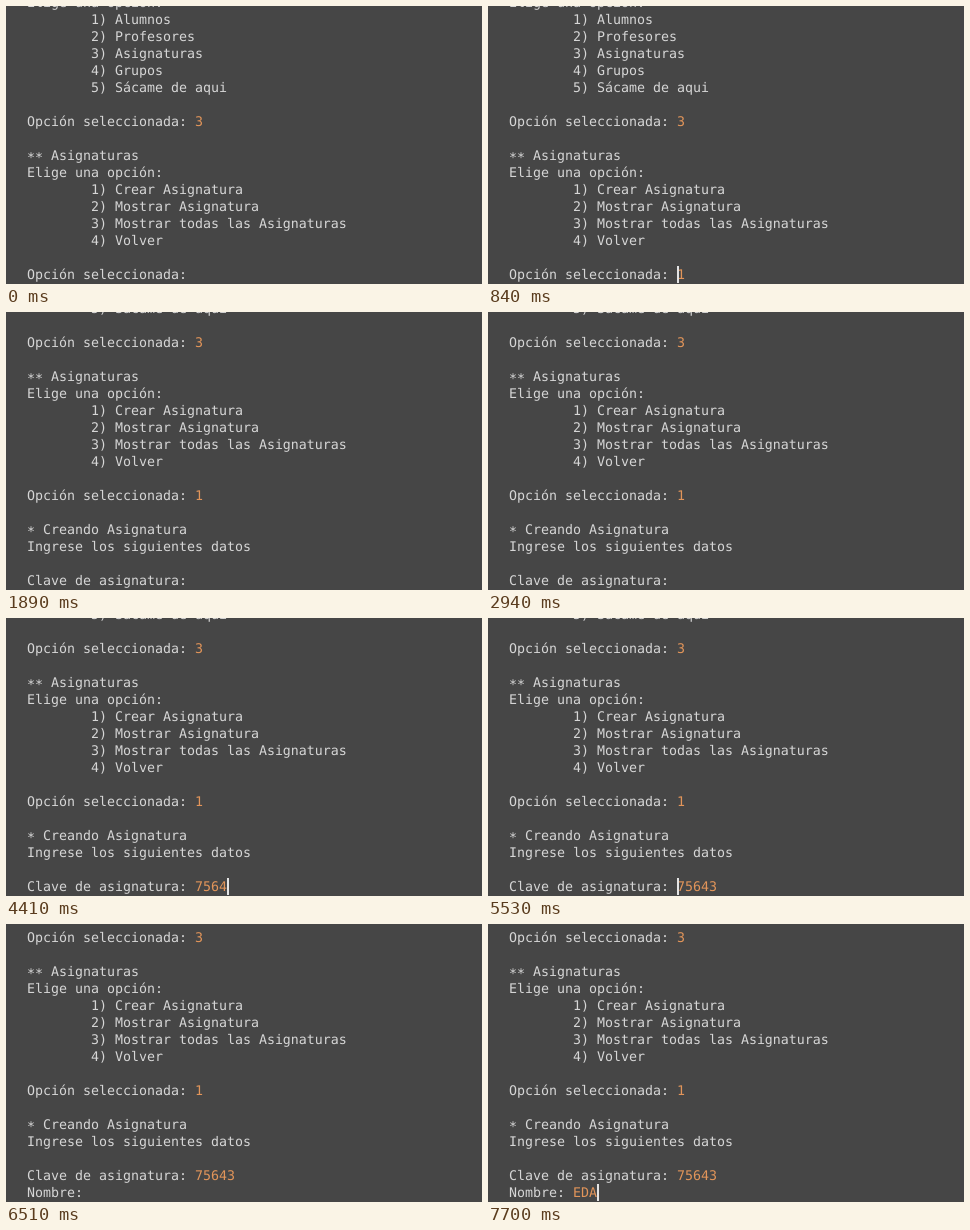
Write an HTML page that moves like this. It is 476x278 px and loops after 8000 ms.

```html
<!DOCTYPE html>
<html lang="es">
<head>
<meta charset="utf-8">
<title>Consola</title>
<style>
  html, body { margin: 0; width: 100%; height: 100%; overflow: hidden; background: #464646; }
  svg { display: block; width: 476px; height: 278px; }
  text {
    font: 13.29px "DejaVu Sans Mono", monospace;
    fill: #d6d6d6;
    white-space: pre;
    text-rendering: geometricPrecision;
  }
  .input { fill: #e2955a; }
</style>
</head>
<body>
<svg viewBox="0 0 476 278">
  <rect width="476" height="278" fill="#464646"/>
  <g id="screen"></g>
  <rect id="caret" width="2" height="17" fill="#e4e4e4"/>
</svg>
<script>
const LOOP = 8000, LEFT = 21, CELL = 8, ROW = 17, LAST_ROW = 260, BASE = 13;
const TAB = ' '.repeat(8);
const PROMPT = 'Opción seleccionada: ';

// Each line: printed text, then the typed part if any
const lines = [
  ['Elige una opción:'],
  [TAB + '1) Alumnos'],
  [TAB + '2) Profesores'],
  [TAB + '3) Asignaturas'],
  [TAB + '4) Grupos'],
  [TAB + '5) Sácame de aqui'],
  [''],
  [PROMPT, '3'],
  [''],
  ['** Asignaturas'],
  ['Elige una opción:'],
  [TAB + '1) Crear Asignatura'],
  [TAB + '2) Mostrar Asignatura'],
  [TAB + '3) Mostrar todas las Asignaturas'],
  [TAB + '4) Volver'],
  [''],
  [PROMPT, '1'],
  [''],
  ['* Creando Asignatura'],
  ['Ingrese los siguientes datos'],
  [''],
  ['Clave de asignatura: ', '75643'],
  ['Nombre: ', 'EDA']
];
const OPTION = 16, KEY = 21, NAME = 22;

// start time, bottom line, typed characters, caret column (-1 = hidden), bottom prompt shown
const steps = [
  [0, OPTION, 0, -1],
  [420, OPTION, 1, 22],
  [840, OPTION, 1, 21],
  [1120, KEY, 0, 0],
  [1400, KEY, 0, 21],
  [1890, KEY, 0, -1],
  [2380, KEY, 0, 21],
  [2940, KEY, 0, -1],
  [3220, KEY, 1, 22],
  [3570, KEY, 2, 23],
  [3920, KEY, 3, 24],
  [4410, KEY, 4, 25],
  [4900, KEY, 4, -1],
  [5180, KEY, 5, 26],
  [5530, KEY, 5, 21],
  [5740, NAME, 0, 0, false],
  [5810, NAME, 0, 0],
  [6020, NAME, 0, 8],
  [6510, NAME, 0, -1],
  [7070, NAME, 0, 8],
  [7280, NAME, 1, 9],
  [7560, NAME, 2, 10],
  [7700, NAME, 3, 11]
];

const screen = document.getElementById('screen');
const caret = document.getElementById('caret');

function svg(name, attrs, parent, content = '') {
  const el = document.createElementNS('http://www.w3.org/2000/svg', name);
  for (const key in attrs) el.setAttribute(key, attrs[key]);
  el.textContent = content;
  return parent.appendChild(el);
}

// Asterisks sit at mid-height, so they are lowered slightly
function addRow([printed, typed = ''], i) {
  const y = i * ROW + BASE;
  const stars = printed.match(/^\**/)[0];
  const put = (col, text, cls, dy = 0) =>
    svg('text', { x: LEFT + col * CELL, y: y + dy, class: cls }, row, text);
  const row = svg('g', {}, screen);
  if (stars) put(0, stars, 'label', 2);
  const label = put(stars.length, printed.slice(stars.length), 'label');
  const input = put(printed.length, typed, 'input');
  return { row, label, input, typed };
}

const rows = lines.map(addRow);
let shown = null;

function draw(time) {
  const step = steps.findLast(s => s[0] <= time % LOOP);
  if (step === shown) return;
  shown = step;
  const [, bottom, count, column, prompt = true] = step;
  screen.setAttribute('transform', `translate(0 ${LAST_ROW - bottom * ROW})`);
  rows.forEach(({ row, label, input, typed }, i) => {
    row.setAttribute('visibility', i <= bottom ? 'visible' : 'hidden');
    label.setAttribute('opacity', i < bottom || prompt ? 1 : 0);
    input.textContent = i < bottom ? typed : typed.slice(0, count);
  });
  caret.setAttribute('visibility', column < 0 ? 'hidden' : 'visible');
  caret.setAttribute('x', LEFT + Math.max(column, 0) * CELL);
  caret.setAttribute('y', LAST_ROW);
}

const start = performance.now();
function tick() {
  draw(performance.now() - start);
  requestAnimationFrame(tick);
}
tick();
</script>
</body>
</html>
```
